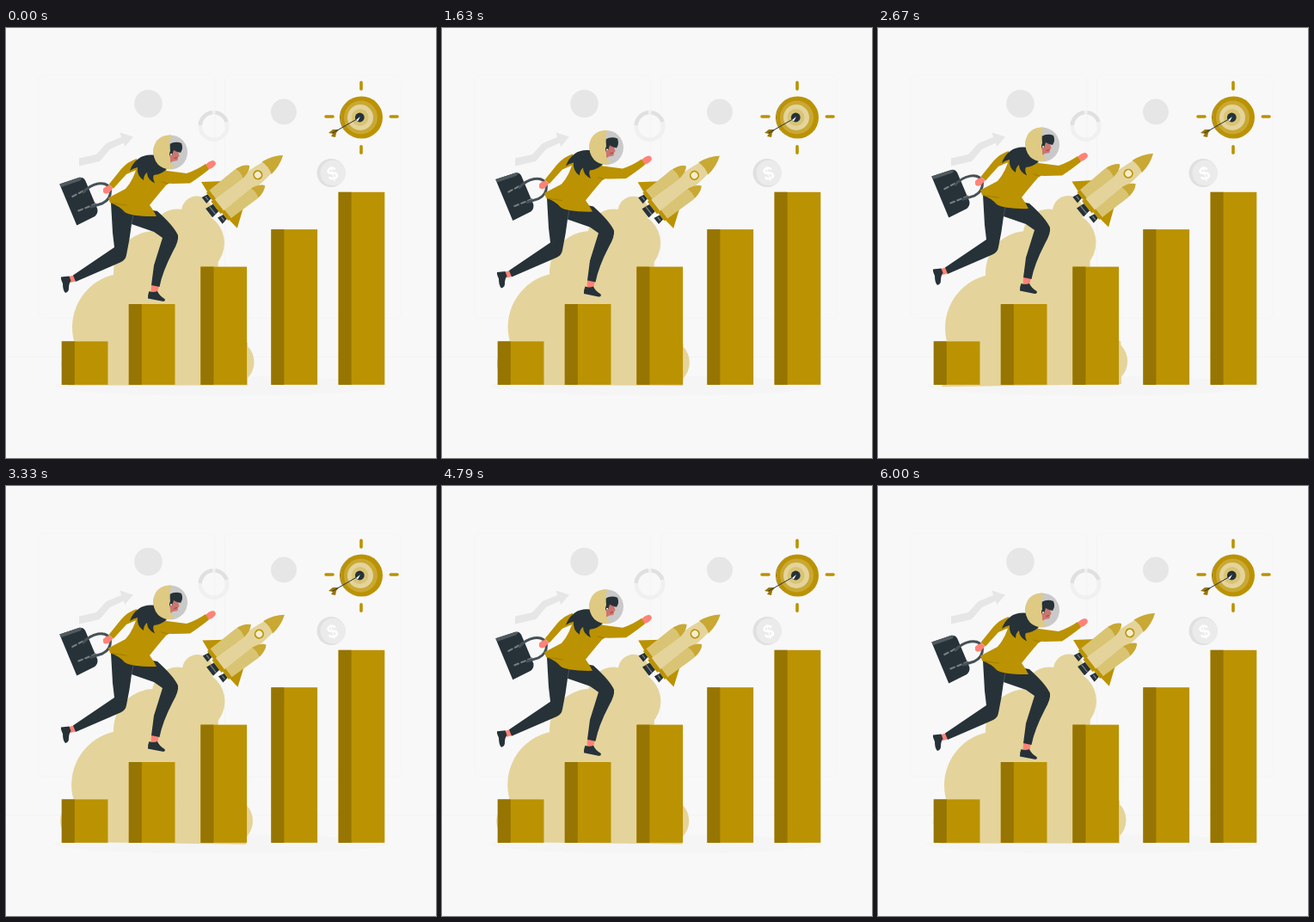
An HTML page that plays this animation: 500x500 px, repeating every 6040 ms.

```html
<!DOCTYPE html>
<html lang="en">
<head>
<meta charset="utf-8">
<title>Climbing the chart</title>
<style>
  html, body { margin: 0; width: 100%; height: 100%; overflow: hidden; background: #f8f8f8; }
  svg { display: block; width: 100%; height: 100%; }
  .gold { fill: #bb9202; }
  .deep { fill: #967502; }
  .bright { fill: #c9a834; }
  .mid { fill: #d9c474; }
  .pale { fill: #e4d49b; }
  .ink { fill: #263238; }
  .skin { fill: #ff8277; }
  .line { fill: none; stroke-linecap: round; stroke-linejoin: round; }
  text { font: bold 22px "Liberation Sans", Arial, sans-serif; }
</style>
</head>
<body>
<svg viewBox="0 0 500 500">
  <!-- wall and floor -->
  <g fill="none" stroke="#ebebeb" stroke-width=".25">
    <rect x="38.2" y="55" width="204.5" height="282.8" rx="5.7"/>
    <rect x="254.5" y="55" width="204.5" height="282.8" rx="5.7"/>
    <path d="M0 382.5H500" stroke-width=".4"/>
  </g>
  <ellipse cx="250" cy="416.2" rx="193.9" ry="11.3" fill="#f5f5f5"/>

  <!-- grey icons -->
  <g fill="#e6e6e6">
    <circle cx="165.5" cy="88" r="16.3"/>
    <circle cx="323" cy="97.5" r="15"/>
    <path d="M85 151.5L105 147L117 134L134 127L132.5 121.5L148 126.5L138 138L137 133.5L121 141L109 155L85 160.5Z"/>
    <circle cx="378" cy="168.5" r="16.5" fill="#e0e0e0"/>
    <circle cx="380.3" cy="168.5" r="14.8" fill="#ebebeb"/>
    <text x="379.5" y="176.7" text-anchor="middle" fill="#fff" transform="rotate(-16 379.5 169)">$</text>
  </g>
  <g fill="none" stroke-width="4.5">
    <circle cx="241.5" cy="114" r="15.8" stroke="#f0f0f0"/>
    <path d="M225.7 113A15.8 15.8 0 0 1 240 98.3M243.500 98.3A15.8 15.8 0 0 1 256.500 109" stroke="#e0e0e0"/>
  </g>

  <!-- dartboard -->
  <path class="line" stroke="#bb9202" stroke-width="3.6" d="M413 63.2V71M413 137.7V145.3M372 103H380M447.3 103H455"/>
  <circle class="gold" cx="413.5" cy="104" r="24.5"/>
  <path class="deep" d="M413.5 79.5A24.5 24.5 0 0 0 413.5 128.500A25.500 24.500 0 0 1 413.500 79.500Z"/>
  <circle class="bright" cx="412.5" cy="104" r="19.5"/>
  <circle class="pale" cx="412" cy="104" r="15"/>
  <circle class="mid" cx="411.600" cy="104" r="10"/>
  <circle class="ink" cx="411.3" cy="104" r="5.4"/>
  <path class="deep" d="M375 122L380 118L387 118L384 122L383 127L378 126L380 123Z"/>
  <path class="line" stroke="#263238" d="M410.5 104.5L380 122"/>
  <path d="M407 107L412 103L409 108.5Z" fill="#fff"/>

  <g id="launch">
    <g class="pale">
      <path d="M72 415.5L85 372L140 300L215 235L247 260L245 345L281 366V415.5Z"/>
      <circle cx="140" cy="348" r="63"/>
      <circle cx="173" cy="284" r="48"/>
      <circle cx="199" cy="240" r="29.5"/>
      <circle cx="222" cy="213.5" r="18"/>
      <circle cx="218" cy="250" r="36"/>
      <circle cx="262" cy="388.5" r="26.5"/>
      <circle cx="89" cy="391" r="24.5"/>
    </g>
    <!-- rocket axis runs along x, with its tip at the origin -->
    <g transform="translate(322 148) rotate(-38)">
      <path class="ink" d="M-97-5L-109-6.5V6.5L-97 5ZM-96-18L-104.5-19.500V-10.500L-96-12ZM-96 18L-104.5 19.5V10.5L-96 12Z"/>
      <path class="line" stroke="#788085" stroke-width="1.3" d="M-104-5V5M-100.500-17V-13M-100.500 13V17"/>
      <path class="gold" d="M-73-19L-94-34L-96-16ZM-73 19L-94 34L-96 16Z"/>
      <path class="pale" d="M-99-9L-60-10.5Q-16-11 0 0Q-16 11-60 10.500L-99 9Z"/>
      <path class="bright" d="M-24-9.100Q-10-7.500 0 0Q-10 7.500-24 9.100Q-21 0-24-9.100Z"/>
      <path class="gold" d="M-99-9L-94-9.200V9.200L-99 9Z"/>
      <g id="booster">
        <path class="mid" d="M-97 8.500L-55 7.500Q-43 9-38 14.600Q-43 20-55 21.500L-97 20.500Z"/>
        <path class="bright" d="M-53 7.600Q-42 9-38 14.600Q-42 20-53 21.300Q-50.500 14.600-53 7.600Z"/>
        <path class="gold" d="M-97 8.500L-92.500 8.300V20.800L-97 20.500Z"/>
      </g>
      <use href="#booster" transform="scale(1 -1)"/>
      <circle class="gold" cx="-37" r="5.6"/>
      <circle cx="-37" r="3.9" fill="#f4edcf"/>
    </g>
  </g>

  <g id="bars"></g>

  <g id="runner">
    <!-- briefcase -->
    <g transform="translate(-.7 -.5)">
      <path class="ink" d="M63 182L86 174.3Q91 173.5 93 178L107 211Q108 216 104 219.5L83 230Z"/>
      <path d="M63 182L86 174.3L89.5 175L87 178L65 185.5Z" fill="#505a5f"/>
      <path class="line" stroke="#788085" stroke-width="2" stroke-dasharray="5 3.5" d="M78 196.5L94 188M85 213L105 205"/>
    </g>
    <path class="line" stroke="#465157" stroke-width="3" d="M90 191Q97 183 107 181Q119 179 121.500 189Q122 199 112 204L99 208"/>

    <!-- rear hand and sleeve -->
    <path class="skin" d="M113 187Q116 183.500 120 183L124.500 186L120 191.500Q115.500 194 113 191Z"/>
    <path class="gold" d="M152 152Q142 155 134 164L119.500 182L125 186.500L140 170L154 164Z"/>

    <!-- legs -->
    <path class="skin" d="M80 287L72 289.500L75 296L81 294.500ZM169 298L168.500 308H176L178 299Z"/>
    <path class="ink" d="M73.500 288.500Q69 289 64 289.500Q63.500 292 66 297Q66 305 69 308Q73 307 73 303Q73 297 75.500 294Z"/>
    <path class="ink" d="M166.500 306Q171 308 176 306Q178 311 184.500 315Q186 318 182 317.800L165 314.500Q164.500 310.500 166.500 306Z"/>
    <path class="ink" d="M122 203L124 238L126 255L78 287.500L81 295L133 272.500Q139 270 140 264Q144 245 146 228L172 237L182 244L172 276L169 299L178.500 301Q182 283 194 260Q201 248 200 241Q195 230 176 213L150 208Z"/>
    <path class="line" stroke="#566066" stroke-width=".7" d="M146 228L148 217"/>

    <!-- jacket and front arm -->
    <path class="skin" d="M232 159Q236 154.500 241 154Q245 156 243.500 159Q240 164 235 164Z"/>
    <path class="gold" d="M153 158Q149 176 139 187L119 197.500L121 203Q132 207 138 214Q146 219.500 175 219Q171 211 167 206Q174 197 186 183Q189 180 193 181L214 180.500Q224 174 236 164.500L232 158Q222 165 210 169L187 166L174 157Z"/>
    <path class="line" stroke="#967502" stroke-width=".7" d="M122 203.500L140 206M181 179L188 181"/>

    <!-- hair and helmet -->
    <circle cx="191" cy="144.500" r="20" fill="#c9c9c9"/>
    <path fill="#c9776e" d="M190 140L200 143L201.500 149L200 150.500L199.500 154L194 155L190 158Z"/>
    <path class="ink" d="M190 135Q197 131 204 134Q206.500 140 203 145Q198 144 195 142L193 148H189Z"/>
    <path d="M195.500 151.500L199 150.500" stroke="#b5323c"/>
    <path class="ink" d="M176 148Q161 146 154 152Q147 157 144 166Q148 163 153 162Q152 172 160 177Q160 171 164 168Q164 176 173 180.500Q170 174 172 171Q181 170 187 164L186 158Z"/>
    <path fill="#dfca83" d="M192 124.500Q175 124 171.500 140Q170 151 177 159Q184 165 191 164L196 161Q190 158 191 151Q189 147 191 143Q190 133 192 124.500Z"/>
    <circle cx="192" cy="147" r="1" fill="#fff"/>
  </g>
</svg>
<script>
const LOOP = 6040, FRAMES = 145, FPS = 24;
const get = id => document.getElementById(id);

get("bars").innerHTML = [64.8, 142.8, 226.4, 308.4, 386.6].map((x, i) => {
  const y = 364.4 - 43.4 * i, h = 414.8 - y;
  return `<rect class="gold" x="${x}" y="${y}" width="53.7" height="${h}"/>
    <rect class="deep" x="${x}" y="${y}" width="15" height="${h}"/>`;
}).join("");

// Triangle wave: 0, 1, 0, -1, 0 over one unit.
const sway = p => Math.abs(((p + 0.75) % 1) * 4 - 2) - 1;

function draw(now) {
  const s = Math.floor((now % LOOP) * FRAMES / LOOP) / FPS;
  const lift = 10 * (1 - Math.abs(s / 3 - 1));
  get("runner").setAttribute("transform", `translate(0 ${-lift})`);
  get("launch").setAttribute("transform", `rotate(${sway(s / 1.5)} 193 282)`);
}

let start;
function tick(now) {
  start ??= now;
  draw(now - start);
  requestAnimationFrame(tick);
}
draw(0);
requestAnimationFrame(tick);
</script>
</body>
</html>
```
